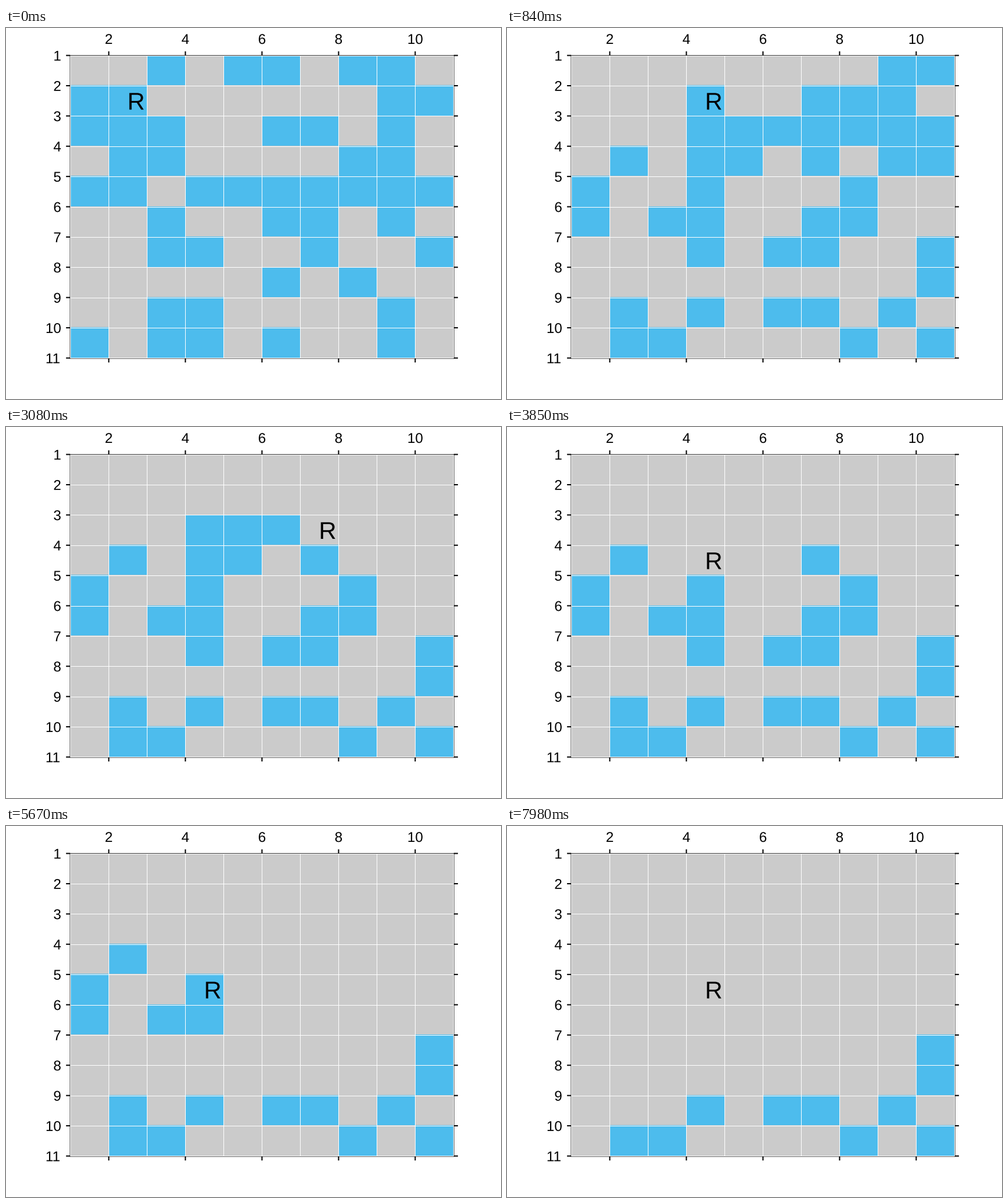
A matplotlib script for the animation above (8 s loop, 840x630 px).

```python
import matplotlib.pyplot as plt
import numpy as np
from matplotlib.animation import FuncAnimation
from matplotlib.colors import ListedColormap
from matplotlib.patches import PathPatch
from matplotlib.textpath import TextPath
from matplotlib.transforms import Affine2D

W, H, DPI = 840, 630, 100
LEFT, RIGHT, TOP, BOTTOM = 109.4, 759.4, 46.6, 560.45
N = 10
CW, CH = (RIGHT - LEFT) / N, (BOTTOM - TOP) / N
LOOP_MS, FRAME_MS, STEP_MS = 8000, 20, 70
GREY, BLUE, EDGE = "#cbcbcb", "#4dbced", "#606060"
LABEL_PX, ROBOT_PX = 24, 41
DIGIT_W = 0.556 * LABEL_PX

plt.rcParams["font.family"] = "Liberation Sans"

# Dirty columns of each row; "0" stands for column 10
FIRST_ROOM = "35689 1290 123679 2389 124567890 3679 3470 68 349 13469"
SECOND_ROOM = "24690 4789 4567890 245790 148 13478 4670 0 24679 2380"

START = (1, 1)
MOVES = {"U": (-1, 0), "D": (1, 0), "L": (0, -1), "R": (0, 1)}
# U, D, L, R drive one cell; C cleans the current cell
ROUTE = ("UCRRCRRCDLL" "CRRRCRCRCUCR" "CDLLDCRCDCUR" "CDCULLLCLCLD"
         "CUCLCDCURRDR" "CDLLRRRCDCLC" "DCLCLLCUUCUU" "LLDCLDCRUDDL"
         "CDDDDRUCULUR" "RUCRCU")


def room(spec):
    grid = np.zeros((N, N), int)
    for r, cols in enumerate(spec.split()):
        for c in cols:
            grid[r, (int(c) - 1) % N] = 1
    return grid


def simulate():
    states = [(room(FIRST_ROOM), START)]
    grid, (r, c) = room(SECOND_ROOM), START
    states.append((grid.copy(), (r, c)))
    for act in ROUTE:
        if act == "C":
            grid[r, c] = 0
        else:
            dr, dc = MOVES[act]
            r, c = r + dr, c + dc
        states.append((grid.copy(), (r, c)))
    return states


STATES = simulate()

fig = plt.figure(figsize=(W / DPI, H / DPI), dpi=DPI, facecolor="white")
ax = fig.add_axes([0, 0, 1, 1])
ax.axis("off")


def line(x0, y0, x1, y1, color, z=3):
    ax.plot([x0, x1], [y0, y1], color=color, lw=72 / DPI,
            solid_capstyle="butt", zorder=z)


def tick(x0, y0, x1, y1):
    ax.plot([x0, x1], [y0, y1], color="black", lw=2 * 72 / DPI,
            solid_capstyle="butt", snap=False, zorder=4)


def place(patch, x, y):
    patch.set_transform(Affine2D().scale(1, -1).translate(x, y) + ax.transData)


def text(x, y, s, px):
    """Text with its origin at the left end of the baseline."""
    patch = PathPatch(TextPath((0, 0), s, size=px), fc="black", lw=0, zorder=5)
    ax.add_patch(patch)
    place(patch, x, y)
    return patch


cells = ax.imshow(STATES[0][0], cmap=ListedColormap([GREY, BLUE]), vmin=0, vmax=1,
                  extent=(LEFT, RIGHT, BOTTOM, TOP), origin="upper",
                  interpolation="nearest", aspect="auto", zorder=1)

# White grid
for k in range(N + 1):
    x, y = LEFT + k * CW, TOP + k * CH
    line(x, TOP, x, BOTTOM, "white", z=2)
    line(LEFT, y, RIGHT, y, "white", z=2)

# Frame, one pixel outside the grid
x0, x1, y0, y1 = LEFT - 1, RIGHT + 1, TOP - 1, BOTTOM + 1
line(x0, y0, x0, y1, EDGE)
line(x1, y0, x1, y1, EDGE)
line(x0, y1, x1, y1, EDGE)
line(x0, y0, x1, y0, "#303030")

# Ticks and their numbers
for k in range(N + 1):
    y, s = TOP + k * CH, str(k + 1)
    tick(x0 - 6.5, y, x0 + 0.5, y)
    tick(x1 - 0.5, y, x1 + 6.5, y)
    text(93.7 - DIGIT_W * len(s), y + 8.8, s, LABEL_PX)
for n in range(2, N + 1, 2):
    x, s = LEFT + (n - 1) * CW, str(n)
    tick(x, y0 - 6, x, y0 + 0.5)
    tick(x, y1 - 0.5, x, y1 + 6.5)
    text(x - DIGIT_W * len(s) / 2, 27, s, LABEL_PX)

robot = text(0, 0, "R", ROBOT_PX)
ax.set_xlim(0, W)
ax.set_ylim(H, 0)


def draw(i):
    step = (i * FRAME_MS + FRAME_MS // 2) // STEP_MS
    grid, (r, c) = STATES[min(step, len(STATES) - 1)]
    cells.set_data(grid)
    place(robot, LEFT + c * CW + 31.6, TOP + r * CH + 40.6)
    return cells, robot


anim = FuncAnimation(fig, draw, frames=LOOP_MS // FRAME_MS, interval=FRAME_MS,
                     repeat=True, repeat_delay=0)
plt.show()
```
